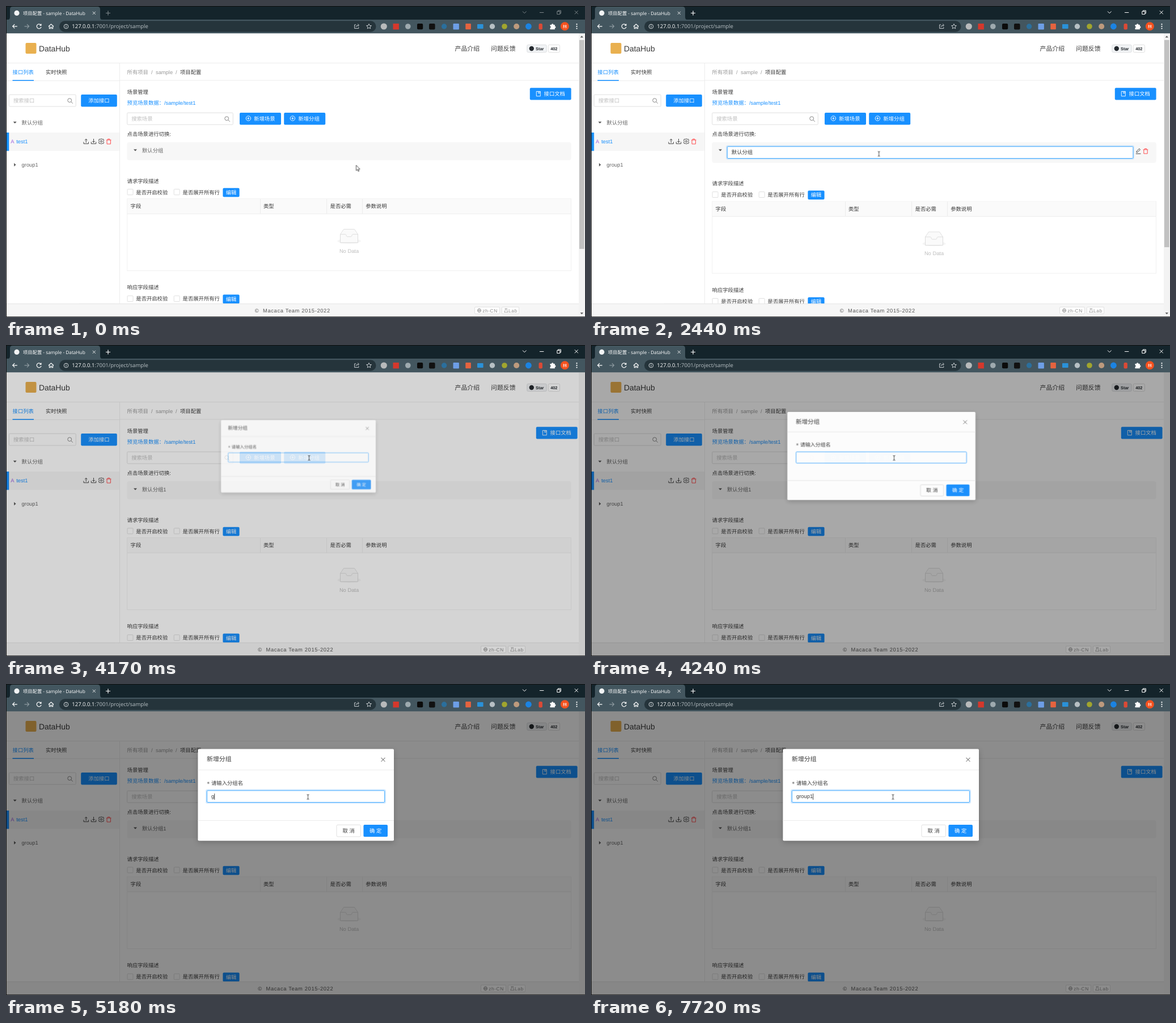
Recreate the animation shown at these times as an HTML page. Size 1021 by 548 pixels, loop 8000 ms.

```html
<!DOCTYPE html>
<html lang="zh">
<head>
<meta charset="utf-8">
<title>DataHub</title>
<style>
html, body { margin: 0; width: 100%; height: 100%; overflow: hidden; background: #fff; }
svg { display: block; width: 100vw; height: 100vh; }
text { font: 9.33px "Liberation Sans", "Noto Sans CJK SC", "Noto Sans CJK", sans-serif; fill: #3a3a3a; text-rendering: geometricPrecision; white-space: pre; }
.ui text { font-family: "Open Sans", "Noto Sans CJK SC", "Noto Sans CJK", sans-serif; fill: #fff; }
.big { font-size: 10.9px; }
.mid { text-anchor: middle; }
text.gray { fill: #999; }
text.soft { fill: #666; }
text.hint { fill: #bfbfbf; }
text.link { fill: #1890ff; }
text.white { fill: #fff; }
.badge text { font-size: 7.4px; font-weight: 700; fill: #24292e; }
.foot text { fill: #555; letter-spacing: .65px; }
.foot .tag text { font-size: 8.4px; fill: #8c8c8c; letter-spacing: .55px; }
.btn { fill: #1890ff; }
.box { fill: #fff; stroke: #d9d9d9; stroke-width: .8; }
.rule { fill: none; stroke: #ececec; }
.line { fill: none; stroke: #444; }
.red { stroke: #ff4d4f; }
.pale { stroke: #fff; }

/* Shared 8 s clock: 1% = 80 ms */
.a { animation: 8s step-end infinite; }
.focus { animation-name: focus; }
.actions { animation-name: actions; }
.edit { animation-name: edit; }
.plain { animation-name: plain; }
.shift { animation-name: shift; }
.renamed { animation-name: renamed; }
.hover { animation-name: hover; }
.bar { animation-name: bar; }
.thumb { animation-name: thumb; }
.wide { animation-name: wide; }
.wide2 { animation-name: wide2; }
.mask { animation-name: mask; }
.modal { animation-name: modal; transform-origin: 532px 198px; }
.glow { animation-name: glow; }
.caret { animation-name: caret; }
.cursor { animation-name: move; animation-timing-function: linear; }
.arrow { animation-name: arrow; }
.hand { animation-name: hand; }
.beam { animation-name: beam; }
.k1 { animation-name: k1; } .k2 { animation-name: k2; } .k3 { animation-name: k3; }
.k4 { animation-name: k4; } .k5 { animation-name: k5; } .k6 { animation-name: k6; }

@keyframes focus { 0% { opacity: .45 } 4.3%, 100% { opacity: 1 } }
@keyframes actions { 0% { opacity: 0 } 6.1% { opacity: 1 } 44.5%, 100% { opacity: 0 } }
@keyframes edit { 0% { opacity: 0 } 16.6% { opacity: 1 } 42.8%, 100% { opacity: 0 } }
@keyframes plain { 0% { opacity: 1 } 16.6% { opacity: 0 } 42.8%, 100% { opacity: 1 } }
@keyframes shift { 0% { transform: none } 16.6% { transform: translateY(4.6px) } 42.8%, 100% { transform: none } }
@keyframes renamed { 0% { opacity: 0 } 38%, 100% { opacity: 1 } }
@keyframes hover { 0% { fill: #1890ff } 49.4%, 100% { fill: #40a9ff } }
@keyframes bar { 0% { opacity: 1 } 51.2%, 100% { opacity: 0 } }
@keyframes thumb { 0% { height: 368px } 16.6% { height: 365px } 42.8%, 100% { height: 368px } }
@keyframes wide { 0% { transform: none } 51.2%, 100% { transform: translateX(11px) } }
@keyframes wide2 { 0% { transform: none } 51.2%, 100% { transform: translateX(5.5px) } }
@keyframes mask { 0% { opacity: 0 } 52.1% { opacity: .17 } 53% { opacity: .34 } 53.8% { opacity: .44 } 54.7%, 100% { opacity: .45 } }
@keyframes modal {
  0% { opacity: 0; transform: scale(.2) }
  52.1% { opacity: .78; transform: scale(.79) }
  53% { opacity: .97; transform: scale(.96) }
  53.8% { opacity: 1; transform: scale(.997) }
  54.7%, 100% { opacity: 1; transform: none }
}
@keyframes glow { 0% { opacity: 0 } 57.1%, 100% { opacity: .2 } }
@keyframes caret {
  0% { opacity: 0; transform: none }
  57.1% { opacity: 1; transform: none }
  63.8% { transform: translateX(5.2px) }
  66% { transform: translateX(8.3px) }
  68.2% { transform: translateX(13.5px) }
  72.3% { transform: translateX(18.7px) }
  74.8% { opacity: 1; transform: translateX(23.9px) }
  81.5% { opacity: 0; transform: translateX(23.9px) }
  83.2% { opacity: 1; transform: translateX(29.1px) }
  89.8% { opacity: 0; transform: translateX(29.1px) }
  96.4%, 100% { opacity: 1; transform: translateX(29.1px) }
}
@keyframes k1 { 0% { opacity: 0 } 63.8%, 100% { opacity: 1 } }
@keyframes k2 { 0% { opacity: 0 } 66%, 100% { opacity: 1 } }
@keyframes k3 { 0% { opacity: 0 } 68.2%, 100% { opacity: 1 } }
@keyframes k4 { 0% { opacity: 0 } 72.3%, 100% { opacity: 1 } }
@keyframes k5 { 0% { opacity: 0 } 74.8%, 100% { opacity: 1 } }
@keyframes k6 { 0% { opacity: 0 } 83.2%, 100% { opacity: 1 } }
@keyframes move {
  0%, .8% { transform: translate(617.5px, 280.5px) }
  10.2% { transform: translate(925px, 262px) }
  13.7%, 24.6% { transform: translate(964px, 257px) }
  30.5% { transform: translate(508.5px, 260.5px) }
  33.8%, 38.5% { transform: translate(289px, 261px) }
  42.8% { transform: translate(360px, 255px) }
  47.7% { transform: translate(543px, 216px) }
  50.3%, 54.2% { transform: translate(534.5px, 199px) }
  54.8%, 100% { transform: translate(532.5px, 199px) }
}
@keyframes arrow { 0% { opacity: 1 } 12.5% { opacity: 0 } 44% { opacity: 1 } 50.3%, 100% { opacity: 0 } }
@keyframes hand { 0% { opacity: 0 } 12.5% { opacity: 1 } 24.6%, 100% { opacity: 0 } }
@keyframes beam { 0% { opacity: 0 } 24.6% { opacity: 1 } 44% { opacity: 0 } 52.1%, 100% { opacity: 1 } }
</style>
</head>
<body>
<svg viewBox="0 0 1021 548" preserveAspectRatio="none">
<defs>
  <g id="search" fill="none" stroke="#888"><circle cx="-.8" cy="-.8" r="3.4"/><path d="M1.7 1.7 4.8 4.8"/></g>
  <g id="plus" fill="none" stroke="#fff" stroke-width=".9"><circle r="4.2"/><path d="M-2.2 0h4.4M0-2.2v4.4"/></g>
  <g id="trash" class="line red"><path d="M-4.3-2.7h8.6M-1.7-2.7v-1.7h3.4v1.7M-3.2-2.7v7h6.4v-7"/></g>
  <path id="down" d="M-3-1.5h6L0 1.8z" fill="#555"/>
  <path id="cross" d="M-3-3 3 3M3-3-3 3"/>
  <g id="globe" fill="none" stroke="#888" stroke-width=".7"><circle r="3.2"/><ellipse rx="1.4" ry="3.2"/><path d="M-3.2 0h6.4"/></g>
  <g id="options">
    <rect class="box" x="214" y="322.8" width="10" height="10" rx="1"/><text x="229.3" y="331.5">是否开启校验</text>
    <rect class="box" x="296.2" y="322.8" width="10" height="10" rx="1"/><text x="311.6" y="331.5">是否展开所有行</text>
    <rect class="btn" x="382.4" y="320.7" width="29.2" height="15.8" rx="2"/>
    <text class="white mid" x="397" y="331.7" font-weight="500" style="font-weight:500">编辑</text>
  </g>
</defs>

<!-- Page -->
<rect width="1021" height="548" fill="#fff"/>
<rect x="34.5" y="65" width="19" height="19" rx="2" fill="#e9b04f"/>
<text x="58" y="79.6" style="font-size:13.9px">DataHub</text>
<text class="big" x="791.5" y="78.8">产品介绍</text>
<text class="big" x="855" y="78.8">问题反馈</text>
<g class="badge">
  <rect x="918.8" y="68.4" width="34.4" height="13.2" rx="2" fill="#f1f3f5" stroke="#d5d7da" stroke-width=".8"/>
  <circle cx="926.8" cy="75" r="4.2" fill="#24292e"/><text x="934" y="77.7">Star</text>
  <rect x="956.3" y="68.4" width="20.2" height="13.2" rx="2" fill="#fff" stroke="#d8d8d8" stroke-width=".8"/>
  <text class="mid" x="966.3" y="77.7">402</text>
</g>
<path class="rule" d="M1 100.5H1010M1 131.7H200M200.5 101V525M200 131H1010"/>

<!-- Sidebar -->
<text class="link" x="11.6" y="119.7">接口列表</text><text x="70" y="119.7">实时快照</text>
<rect class="btn" x="11.5" y="130.4" width="37.5" height="1.6"/>
<rect class="box" x="5.4" y="156.2" width="117.8" height="20.8" rx="1.5"/>
<text class="hint" x="13" y="170">搜索接口</text><use href="#search" x="113" y="167"/>
<rect class="btn" x="132.2" y="156" width="63.6" height="21.4" rx="2"/><text class="white mid" x="164" y="170.2">添加接口</text>
<use href="#down" x="15.7" y="205.2"/><text class="soft" x="27.6" y="208.6">默认分组</text>
<rect x="1" y="223" width="199" height="32.3" fill="#f6f6f6"/><rect class="btn" x="1" y="223" width="4.3" height="32.3"/>
<text x="8.2" y="242" style="fill:#a56be0">A</text><text class="link" x="18.2" y="242">test1</text>
<g class="line">
  <path d="M137 239.5v3.2h8.4v-3.2M141.2 241v-6.5M139 236.6l2.2-2.2 2.2 2.2M150.3 239.5v3.2h8.4v-3.2M154.5 234v6.3M152.3 238.2l2.2 2.2 2.2-2.2"/>
  <path d="M168 233.7l1.3 1.2 2.4-.2.8 2-1 1.8 1 1.8-.8 2-2.4-.2-1.3 1.2-1.3-1.2-2.4.2-.8-2 1-1.8-1-1.8.8-2 2.4.2z"/><circle cx="168" cy="238.5" r="1.5"/>
</g>
<use href="#trash" x="181.2" y="238.8"/>
<use href="#down" transform="translate(15.7 279.8) rotate(-90)"/><text class="soft" x="27.6" y="283">group1</text>

<!-- Main -->
<text class="gray" x="213.6" y="119.7">所有项目</text><text class="gray" x="256" y="119.7">/</text>
<text class="gray" x="264" y="119.7">sample</text><text class="gray" x="299" y="119.7">/</text><text x="307" y="119.7">项目配置</text>
<text x="213.6" y="154.5">场景管理</text>
<text class="link" x="213.6" y="174">预览场景数据：/sample/test1</text>
<g class="a wide">
  <rect class="btn" x="923.8" y="144.2" width="72.8" height="21.4" rx="2"/>
  <path class="line pale" d="M935.3 150.5h7v8.4h-7zM938.8 150.5v3.2h2.2v-3.2" stroke-width=".9"/><text class="white" x="948.6" y="158.4">接口文档</text>
</g>
<rect class="box" x="213.7" y="188.2" width="186.6" height="20.8" rx="1.5"/>
<text class="hint" x="221.2" y="202">搜索场景</text><use href="#search" x="390" y="199"/>
<rect class="btn" x="412" y="188" width="73" height="21.3" rx="2"/><use href="#plus" x="427.4" y="198"/><text class="white" x="437.2" y="202">新增场景</text>
<rect class="btn a hover" x="490.2" y="188" width="73" height="21.3" rx="2"/><use href="#plus" x="505.4" y="198"/><text class="white" x="515.4" y="202">新增分组</text>
<text x="213.6" y="228.6">点击场景进行切换:</text>

<rect x="213.4" y="240" width="783.2" height="31.7" rx="4" fill="#f7f7f7"/>
<g class="a plain">
  <text class="soft" x="240" y="257.8">默认分组<tspan class="a renamed">1</tspan></text>
</g>
<g class="a edit">
  <rect x="213.4" y="240" width="783.2" height="36.5" rx="4" fill="#f7f7f7"/>
  <rect x="239.2" y="246.6" width="717.6" height="23" rx="2" fill="none" stroke="#1890ff" stroke-opacity=".2" stroke-width="2"/>
  <rect x="240.3" y="247.7" width="715.6" height="20.8" rx="1.5" fill="#fff" stroke="#40a9ff"/>
  <text x="247.8" y="261.3">默认分组<tspan class="a renamed">1</tspan></text>
</g>
<use href="#down" x="228" y="254"/>
<g class="a actions">
  <path class="line" d="M960.8 260.3h8.6M961.8 257.8l.5-2 4.5-4.5 1.7 1.7-4.5 4.5z"/><use href="#trash" x="978" y="255.8"/>
</g>

<g class="a shift">
  <text x="213.6" y="311.5">请求字段描述</text><use href="#options"/>
  <rect x="213.7" y="339.7" width="782.7" height="126.8" fill="#fff" stroke="#f0f0f0"/>
  <path d="M214 340h782v26H214z" fill="#fafafa"/>
  <path class="rule" d="M214 366.2H996M448.5 340v26M565.5 340v26M628.5 340v26"/>
  <text x="219.6" y="356">字段</text><text x="454" y="356">类型</text><text x="571.6" y="356">是否必需</text><text x="634.2" y="356">参数说明</text>
  <ellipse cx="605" cy="414.2" rx="20.5" ry="4.4" fill="#f5f5f5"/>
  <g fill="#fafafa" stroke="#d9d9d9" stroke-width=".8">
    <path d="M589.5 402.3 595.5 393.4h19l6 8.9v14.7h-31z"/>
    <path d="M589.5 402.3h8.7c1.1 0 1.9 1 1.9 2.1 0 1.2.8 2.1 1.9 2.1h6c1.1 0 1.9-.9 1.9-2.1 0-1.1.8-2.1 1.9-2.1h8.7v13.4q0 1.3-1.3 1.3h-28.4q-1.3 0-1.3-1.3z"/>
  </g>
  <text class="hint mid" x="605" y="434.8">No Data</text>
  <text x="213.6" y="499.4">响应字段描述</text><use href="#options" y="187.9"/>
</g>

<!-- Footer -->
<rect x="1" y="524.5" width="1020" height="23.5" fill="#f6f6f6"/><path class="rule" d="M1 524.8H1010" style="stroke:#e4e4e4"/>
<g class="foot">
  <g class="a wide2"><text x="438.8" y="540">©</text><text x="453" y="540">Macaca Team 2015-2022</text></g>
  <g class="a wide tag">
    <rect class="box" x="826.6" y="530.4" width="44" height="12" rx="1.5"/><use href="#globe" x="834.5" y="536.5"/><text x="840.3" y="539.6">zh-CN</text>
    <rect class="box" x="874.4" y="530.4" width="30.2" height="12" rx="1.5"/>
    <path d="M879.5 533.3h4.5M880.5 533.3v2.4l-1.9 3.9h6.4l-1.9-3.9v-2.4" fill="none" stroke="#888" stroke-width=".7"/><text x="886" y="539.6">Lab</text>
  </g>
</g>
<rect x="1010" y="48" width="11" height="500" fill="#f3f3f3"/>
<g class="a bar">
  <rect class="a thumb" x="1011" y="60" width="8.6" height="368" fill="#c1c1c1"/>
  <path d="M1012.6 55.6h5.4l-2.7-3zM1012.6 540.2h5.4l-2.7 3z" fill="#555"/>
</g>
<rect class="a mask" x="1" y="48" width="1020" height="500"/>

<!-- Browser -->
<g class="ui">
  <rect width="1021" height="25" fill="#14242b"/>
  <rect y="24" width="1021" height="24.2" fill="#43565f"/>
  <path d="M2 24.5q5 0 5-5V6q0-5 5-5h149q5 0 5 5v13.5q0 5 5 5z" fill="#43565f"/>
  <circle cx="19" cy="12.4" r="4.6" fill="#f1f3f4"/>
  <text x="30" y="15.7" style="font-size:8.3px">项目配置 - sample - DataHub</text>
  <g fill="none" stroke="#fff">
    <use href="#cross" transform="translate(155.3 12.4) scale(.85)"/>
    <g class="a focus">
      <path d="M176 12.5h8M180 8.5v8" stroke-width="1.2"/>
      <path d="M911 9.5l3.3 3.3 3.3-3.3M941 11.5h7.3M971.8 9.6h5v5h-5zM973.4 9.6V8h5v5h-1.6"/><use href="#cross" x="1005.8" y="11.3"/>
    </g>
    <path d="M19.8 35.8h-8M15.3 32.2l-3.6 3.6 3.6 3.6" stroke-width="1.2"/>
    <path d="M32.5 35.8h8M37 32.2l3.6 3.6-3.6 3.6" stroke="#8d9aa0" stroke-width="1.2"/>
    <path d="M61.3 33.3a4 4 0 1 0 .8 3.5M62 31.4v2.7h-2.7" stroke-width="1.2"/>
    <path d="M75 36l4.5-4 4.5 4M76.4 35.5v4.3h2v-2.6h2.2v2.6h2v-4.3" stroke-width="1.1"/>
  </g>
  <rect x="94" y="26.3" width="558.5" height="19.4" rx="9.7" fill="#25343b"/>
  <g fill="none" stroke="#d4d9dc">
    <circle cx="106" cy="36" r="3.8"/><path d="M106 35.2v2.8M106 33.4v1"/>
    <path d="M617.2 33h-2.6v6.5h7.2v-2.3M617 37.3q.4-3.3 4.8-3.5M620.2 31.6l2.3 2.2-2.3 2.2" stroke-width=".9"/>
    <path d="M640 31.5l1.3 2.9 3.1.3-2.4 2.1.7 3.1-2.7-1.6-2.7 1.6.7-3.1-2.4-2.1 3.1-.3z" stroke-width=".9"/>
  </g>
  <text x="116.3" y="39.3" style="font-size:9.5px">127.0.0.1<tspan fill="#b9c1c5">:7001/project/sample</tspan></text>
  <circle cx="666.3" cy="36" r="5.6" fill="#b8babb"/>
  <rect x="682.5" y="31" width="10.4" height="10.4" fill="#d5382c"/>
  <circle cx="708.8" cy="36" r="4.8" fill="#9eaaaf"/>
  <rect x="725" y="31" width="10.2" height="10.2" rx="2" fill="#0b0b0b"/>
  <rect x="746" y="31" width="10.6" height="10.4" rx="2" fill="#111"/>
  <circle cx="772.6" cy="36" r="4.7" fill="#2b6f9d"/>
  <rect x="788.5" y="31" width="10.4" height="10.4" rx="1" fill="#6d9ee6"/>
  <rect x="810.3" y="31" width="9.6" height="10.2" rx="1" fill="#e5633f"/>
  <rect x="831" y="32" width="10.6" height="8" rx="1" fill="#2a91d8"/>
  <circle cx="857.5" cy="36" r="4.7" fill="#b7c0c4"/>
  <circle cx="879" cy="36" r="4.8" fill="#a1a52e"/>
  <circle cx="900.2" cy="36" r="5" fill="#bd9a7d"/>
  <circle cx="921.4" cy="36" r="5.4" fill="#1b83e2"/>
  <rect x="939.5" y="31" width="6.4" height="10.4" rx="2" fill="#db4a36"/>
  <path d="M959.5 33h2.5a1.7 1.7 0 0 1 3.4 0h2.4v2.5a1.7 1.7 0 0 1 0 3.4v2.3h-8.3v-2.6a1.6 1.6 0 0 0 0-3.1z" fill="#fff"/>
  <circle cx="985.4" cy="35.8" r="7.5" fill="#f4511e"/><text class="mid" x="985.4" y="38.6" style="font-size:7.5px">林</text>
  <g fill="#fff"><circle cx="1006.5" cy="32.2" r="1.1"/><circle cx="1006.5" cy="35.9" r="1.1"/><circle cx="1006.5" cy="39.6" r="1.1"/></g>
</g>
<path d="M0 0H1021V1H1V547.2H1021V548H0z" fill="#111"/>

<!-- Dialog -->
<g class="a modal">
  <rect x="338.4" y="114.5" width="345.6" height="161.8" rx="2" fill="#fff" style="filter:drop-shadow(0 3px 5px rgba(0,0,0,.2))"/>
  <path class="rule" d="M338.4 151.4H684M338.4 240.6H684"/>
  <text class="big" x="354" y="136.3">新增分组</text>
  <use href="#cross" transform="translate(665 133.3) scale(1.15)" fill="none" stroke="#777" stroke-width=".9"/>
  <path d="M356.8 172v4.4M354.9 173.1l3.8 2.2M358.7 173.1l-3.8 2.2" stroke="#777" stroke-width=".8"/>
  <text x="362" y="177.7">请输入分组名</text>
  <rect class="a glow" x="353.2" y="186.6" width="315.6" height="23" rx="2" fill="none" stroke="#1890ff" stroke-width="2.4"/>
  <rect x="354.4" y="187.8" width="313.2" height="20.7" rx="1.5" fill="#fff" stroke="#40a9ff"/>
  <g>
    <text class="a k1" x="362" y="201.3">g</text><text class="a k2" x="367.2" y="201.3">r</text><text class="a k3" x="370.3" y="201.3">o</text>
    <text class="a k4" x="375.5" y="201.3">u</text><text class="a k5" x="380.7" y="201.3">p</text><text class="a k6" x="385.9" y="201.3">1</text>
  </g>
  <rect class="a caret" x="362" y="193" width=".8" height="11" fill="#222"/>
  <rect class="box" x="583" y="248.2" width="42.4" height="20.8" rx="2"/><text class="mid" x="604.2" y="261.8">取 消</text>
  <rect class="btn" x="630.4" y="247.9" width="42.6" height="21.3" rx="2"/><text class="white mid" x="651.7" y="261.8" style="font-weight:500">确 定</text>
</g>

<!-- Pointer -->
<g class="a cursor">
  <path class="a arrow" d="M0 0v9.6l2.2-2 1.5 3.3 1.5-.7-1.5-3.2h3z" fill="#fff" stroke="#222" stroke-width=".8"/>
  <path class="a hand" d="M-1 0q1.2-1 2 .2v4l5 1.2q1 .4.8 2l-.8 4.6H0l-3.8-5q0-1.6 1.6-1L-1 7.4z" fill="#fff" stroke="#222" stroke-width=".8"/>
  <path class="a beam" d="M-2-4.2Q0-4.2 0-3 0-4.2 2-4.2M0-3.4v6.8M-2 4.2Q0 4.2 0 3 0 4.2 2 4.2" fill="none" stroke="#333" stroke-width=".9"/>
</g>
</svg>
</body>
</html>
```
